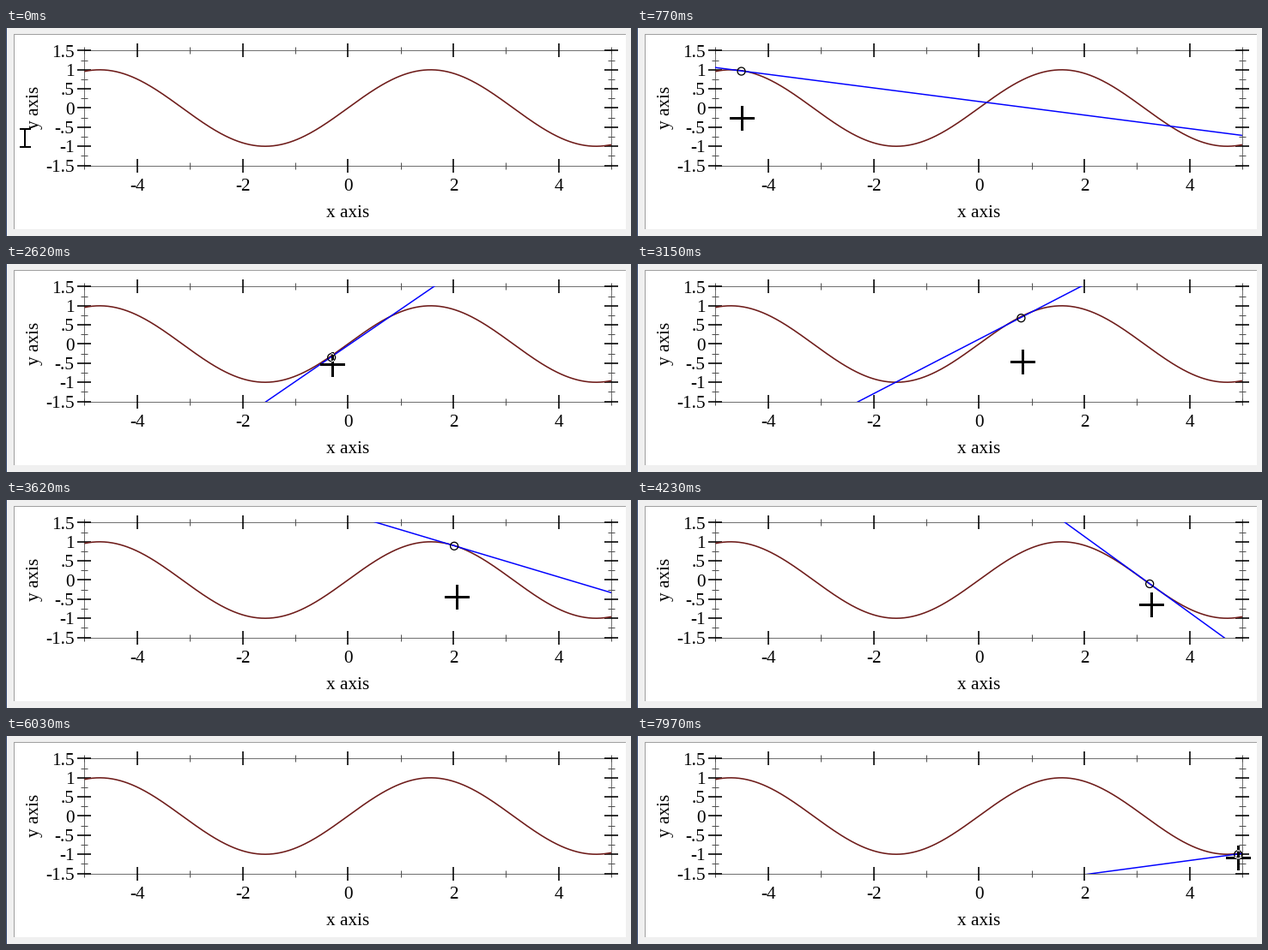
Recreate the animation shown at these times as a matplotlib script. Size 728 px wide and 243 px high, loop 8 s.

```python
import numpy as np
import matplotlib.pyplot as plt
from matplotlib.animation import FuncAnimation
from matplotlib.patches import Circle, Polygon, Rectangle

W, H, DPI = 728, 243, 100
LOOP_MS, INTERVAL = 8000, 20
STEP_MS = LOOP_MS / 104          # the pointer is sampled 13 times a second
PT = 72 / DPI                    # points per pixel

fig = plt.figure(figsize=(W / DPI, H / DPI), dpi=DPI, facecolor="#f0f0f0")
ax = fig.add_axes([0, 0, 1, 1])
ax.set_xlim(0, W)
ax.set_ylim(H, 0)
ax.axis("off")


def px(x):
    return 398.2 + 61.35 * x


def py(y):
    return 93.5 - 44.67 * y


def stroke(x, y, color, width, **kw):
    return ax.plot(x, y, color=color, lw=width * PT, solid_capstyle="butt", **kw)[0]


def label(x, y, text, ha="center", **kw):
    ax.text(x, y, text, family="Liberation Serif", size=21.3 * PT,
            color="black", ha=ha, va="baseline", **kw)


# Window edge and plot panel
ax.add_patch(Rectangle((0, 0), 1, H, fc="#34466e", lw=0))
ax.add_patch(Rectangle((9, 7), 713, 228, fc="#a0a0a0", lw=0))
ax.add_patch(Rectangle((10, 8), 712, 227, fc="white", lw=0))

# Axes
left, right, top, bottom = px(-5), px(5), py(1.5), py(-1.5)
for y in (top, bottom):
    stroke([left, right], [y, y], "#707070", 1)
for x in (left, right):
    stroke([x, x], [top, bottom], "#707070", 1)

for n in range(-5, 6):
    major = n % 2 == 0
    size, width, color = (8, 1.6, "black") if major else (4, 1, "#505050")
    for y in (top, bottom):
        stroke([px(n)] * 2, [y - size, y + size], color, width)
    if major:
        label(px(n), 190.3, str(n))

for n in range(-6, 7):
    major = n % 2 == 0
    size, width, color = (8, 1.6, "black") if major else (4, 1, "#505050")
    y = py(n / 4)
    for x in (left, right):
        stroke([x - size, x + size], [y, y], color, width)
    if major:
        text = f"{n / 4:g}".replace("0.", ".")
        label(79.5, y + 7.3, text, ha="right")

label(398.2, 221, "x axis")
label(38, 92.5, "y axis", rotation=90, rotation_mode="anchor")

# Curve, tangent and touching point
frame = Rectangle((left, top), right - left, bottom - top,
                  transform=ax.transData)
xs = np.linspace(-5, 5, 400)
stroke(px(xs), py(np.sin(xs)), "#6e1c1a", 1.6)
tangent = stroke([], [], "#0000ff", 1.5, zorder=4)
tangent.set_clip_path(frame)
ring = ax.add_patch(Circle((0, 0), 4.5, fill=False, ec="black",
                           lw=1.3 * PT, zorder=5))
OVERLAY = np.array([1, 0.5])     # the overlay sits slightly off the plot

# Pointers, drawn around their hot spot
a, b = 14.5, 1.5
CROSS = np.array([(-b, -a), (b, -a), (b, -b), (a, -b), (a, b), (b, b),
                  (b, a), (-b, a), (-b, b), (-a, b), (-a, -b), (-b, -b)])
ARROW = np.array([(0, 0), (0, 17), (4, 13), (7, 20), (9.5, 19), (6.5, 12.5),
                  (12, 12)])
cross = ax.add_patch(Polygon(CROSS, fc="black", lw=0, zorder=6))
arrow = ax.add_patch(Polygon(ARROW, fc="white", ec="black", lw=PT, zorder=6))
# The cross inverts what lies under it
ring_inv = ax.add_patch(Circle((0, 0), 4.5, fill=False, ec="white",
                               lw=1.3 * PT, zorder=7))
ring_inv.set_clip_path(cross)
gap = np.nan
beam = stroke([22, 22, gap, 15.5, 28.5, gap, 15.5, 28.5],
              [117, 140, gap, 118, 118, gap, 139, 139], "black", 2, zorder=6)

# Sweep keys: step, pointer x, pointer y, touching x in plot units
KEYS = np.array([
    (0, 22, 128, -6.15),
    (10, 122, 105, -4.534),
    (23, 241, 120, -2.599),
    (34, 380, 117, -0.335),
    (47, 525, 113, 1.995),
    (63, 682, 133, 4.561),
    (66, 704, 133, 4.88),
    (67, 710, 133, 4.98),
])
SLOPES = np.gradient(KEYS[:, 1:], KEYS[:, 0], axis=0)


def sweep(step):
    """Cubic Hermite path through the keys."""
    i = min(np.searchsorted(KEYS[:, 0], step, side="right") - 1, len(KEYS) - 2)
    span = KEYS[i + 1, 0] - KEYS[i, 0]
    s = (step - KEYS[i, 0]) / span
    return ((2 * s**3 - 3 * s**2 + 1) * KEYS[i, 1:]
            + (s**3 - 2 * s**2 + s) * span * SLOPES[i]
            + (3 * s**2 - 2 * s**3) * KEYS[i + 1, 1:]
            + (s**3 - s**2) * span * SLOPES[i + 1])


def pose(step):
    """Pointer kind, its place, and the touching x (None when hidden)."""
    if step == 0:
        return "beam", (22, 128), None
    if step <= 67:
        x, y, u = sweep(step)
        return "cross", (x, y), (u if u >= -5 else None)
    if step < 70:
        return "arrow", (709, 121), None
    if step < 76:
        return "arrow", (716, 127), None
    if step == 76:
        return "arrow", (717, 123), None
    if step == 77:
        return "arrow", (721, 144), None
    if step < 101:
        return "none", (0, 0), None
    if step == 101:
        return "arrow", (720, 147), None
    if step == 102:
        return "cross", (712, 147), None
    return "cross", (700, 142), 4.898


def draw(i):
    step = int((i * INTERVAL + 10) / STEP_MS)
    kind, place, u = pose(step)
    spot = np.round(place) + 0.5
    cross.set_xy(CROSS + spot)
    arrow.set_xy(ARROW + spot)
    cross.set_visible(kind == "cross")
    arrow.set_visible(kind == "arrow")
    beam.set_visible(kind == "beam")

    shown = u is not None
    tangent.set_visible(shown)
    ring.set_visible(shown)
    ring_inv.set_visible(shown and kind == "cross")
    if shown:
        dx, dy = OVERLAY
        ends = np.array([-5.1, 5])
        tangent.set_data(px(ends) + dx,
                         py(np.sin(u) + np.cos(u) * (ends - u)) + dy)
        center = (px(u) + dx + 0.5, py(np.sin(u)) + dy + 0.5)
        ring.center = center
        ring_inv.center = center
    return tangent, ring, cross, arrow, ring_inv, beam


anim = FuncAnimation(fig, draw, frames=LOOP_MS // INTERVAL, interval=INTERVAL,
                     init_func=lambda: draw(0), repeat=True, repeat_delay=0)
plt.show()
```
